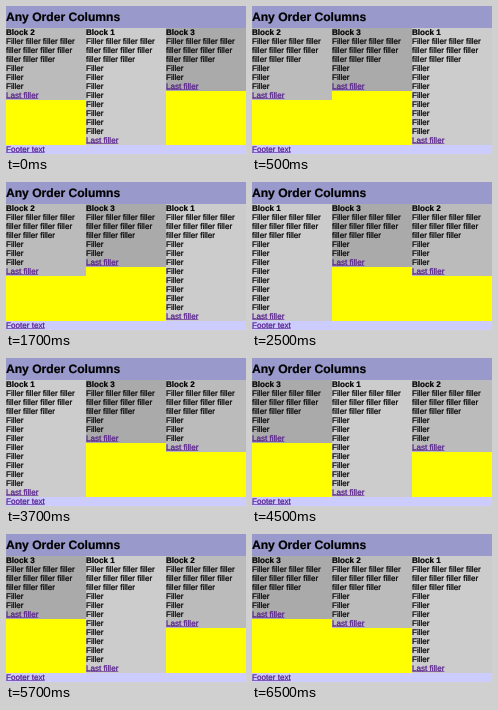
These frames come from a looping animation (240x148 px, 8 s). An HTML page:

```html
<!DOCTYPE html>
<html lang="en">
<head>
<meta charset="utf-8">
<title>Any Order Columns</title>
<style>
  html, body { margin: 0; width: 100%; height: 100%; overflow: hidden; }
  body { position: relative; background: #ff0; color: #000; font: 8.1px/9px "Liberation Sans", Arial, sans-serif; white-space: nowrap; text-rendering: geometricPrecision; }
  header, footer, .block { position: absolute; }
  header { inset: 0 0 auto; height: 22px; background: #99c; }
  h1, h2 { margin: 0; font-weight: bold; }
  h1 { font-size: 12.1px; line-height: 22px; }
  h2 { font-size: inherit; }
  .block { top: 22px; width: 80px; }
  footer { top: 139px; left: 0; right: 0; height: 9px; background: #ccf; }
  /* A tiny turn switches off glyph hinting, for soft letter edges */
  .soft { transform: rotate(.02deg); transform-origin: 0 0; -webkit-text-stroke: .22px; }
  u { color: #551a8b; text-decoration: underline 1px #551a8b99; text-underline-offset: 0; }
</style>
</head>
<body>
<header><h1 class="soft">Any Order Columns</h1></header>
<footer><div class="soft"><u>Footer text</u></div></footer>
<script>
  const LOOP = 8000;
  const blocks = [
    { fill: '#ccc', shortLines: 8 },
    { fill: '#bbb', shortLines: 3 },
    { fill: '#aaa', shortLines: 2 }
  ];
  // Start time, then block numbers from left to right
  const steps = [
    [0, '213'],
    [500, '231'],
    [2500, '132'],
    [4500, '312'],
    [6500, '321']
  ];

  blocks.forEach(({ fill, shortLines }, i) => {
    const el = document.createElement('section');
    el.className = 'block';
    el.style.background = fill;
    el.innerHTML = `<div class="soft"><h2>Block ${i + 1}</h2>
      Filler filler filler filler<br>
      filler filler filler filler<br>
      filler filler filler<br>
      ${'Filler<br>'.repeat(shortLines)}<u>Last filler</u></div>`;
    document.body.append(el);

    const frames = steps.map(([time, order]) => ({
      offset: time / LOOP,
      left: order.indexOf(i + 1) * 80 + 'px',
      easing: 'step-end'
    }));
    frames.push({ ...frames[frames.length - 1], offset: 1 });
    el.animate(frames, { duration: LOOP, iterations: Infinity });
  });
</script>
</body>
</html>
```
